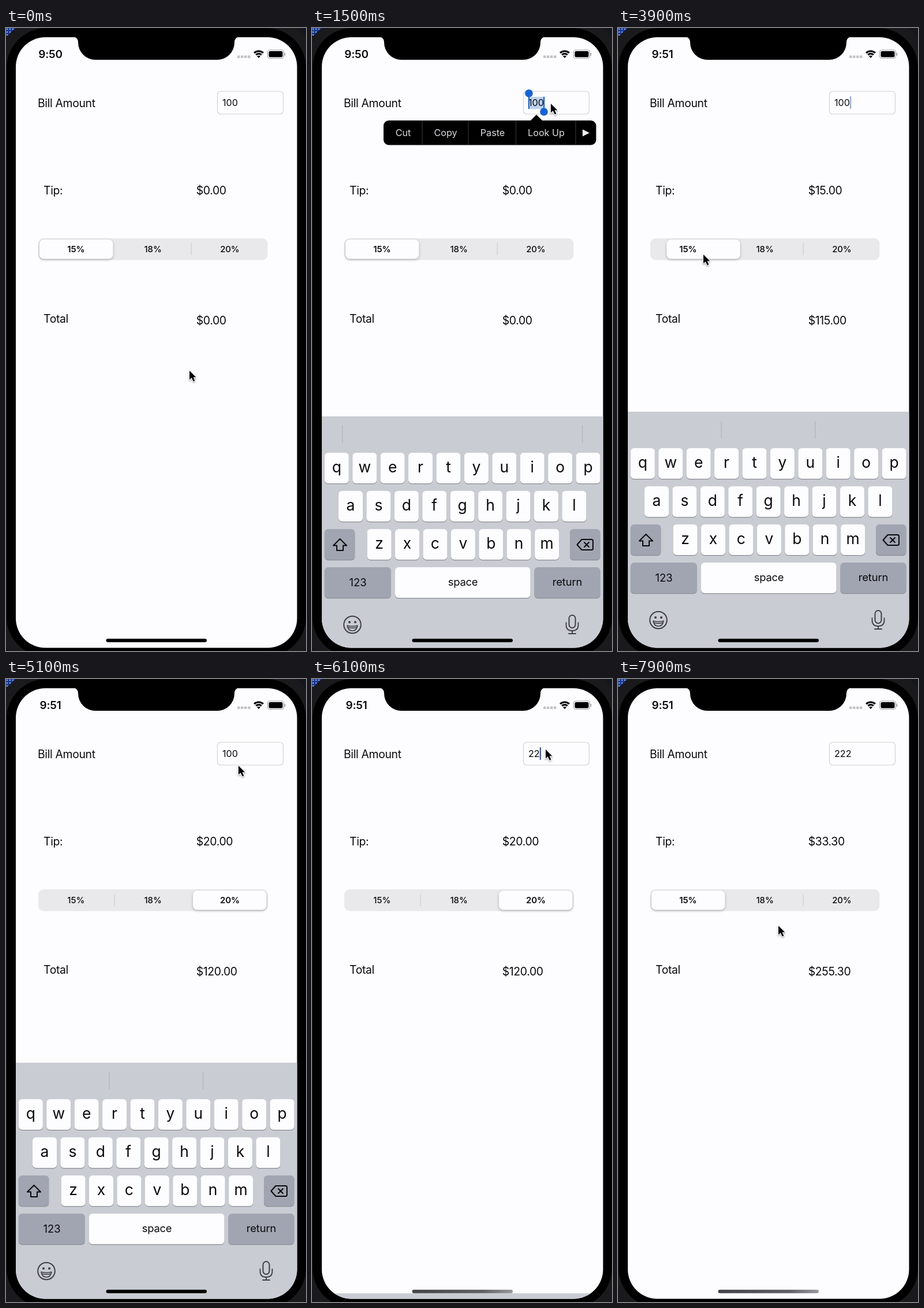
An HTML page with a canvas for the animation above (8000 ms loop, 520 px wide and 1078 px high).

```html
<!DOCTYPE html>
<html lang="en">
<head>
<meta charset="utf-8">
<title>Tip calculator</title>
<style>
html, body { margin: 0; width: 100%; height: 100%; overflow: hidden; background: #000; }
canvas { display: block; }
</style>
</head>
<body>
<canvas id="stage" width="520" height="1078"></canvas>
<script>
const c = document.getElementById('stage').getContext('2d');
const LOOP = 8000, STEP = 100, TAU = Math.PI * 2;
const WHITE = '#fdfcff', INK = '#0a0a0c', BLUE = '#1463d8';
const RATES = [15, 18, 20];
const ARROW = 'M0 1 V16.5 L3.7 13.2 L6.8 19.5 L9.5 18.2 L6.6 12.2 H11.3 Z';

// Pointer stops: time, x, y
const PATH = [
  [0, 318, 592], [900, 414, 130], [2000, 414, 130], [2700, 236, 378], [3300, 236, 378],
  [3700, 148, 391], [4000, 148, 391], [4500, 385, 390], [4700, 385, 390], [5200, 405, 121],
  [6200, 405, 121], [6800, 280, 370], [6900, 264, 381], [7000, 264, 381],
  [7400, 140, 388], [7900, 278, 426]
];
// Segment taps: time, segment
const TAPS = [[3000, 1], [3700, 0], [4500, 2], [6800, 1], [7400, 0]];
const BILLS = [[0, '100'], [5800, '2'], [6000, '22'], [6200, '222']];

const clamp = v => Math.min(1, Math.max(0, v));
const fadeOut = (t, start) => t < start ? 1 : clamp(1 - ((t - start) / 300) ** 2);
const latest = (list, t) => list.filter(e => e[0] <= t).pop();

function box(x, y, w, h, r, fill) {
  c.beginPath();
  c.roundRect(x, y, w, h, r);
  if (fill) { c.fillStyle = fill; c.fill(); }
}

function disc(x, y, r, fill) {
  c.beginPath();
  c.arc(x, y, r, 0, TAU);
  c.fillStyle = fill;
  c.fill();
}

function shape(d, x, y, { fill, stroke, width = 2 }) {
  const p = new Path2D(d);
  c.save();
  c.translate(x, y);
  c.lineJoin = c.lineCap = 'round';
  c.lineWidth = width;
  if (stroke) { c.strokeStyle = stroke; c.stroke(p); }
  if (fill) { c.fillStyle = fill; c.fill(p); }
  c.restore();
}

function text(s, x, y, size, { weight = 400, align = 'left', color = INK, gap = 0 } = {}) {
  c.font = `${weight} ${size}px Inter, "Liberation Sans", sans-serif`;
  c.letterSpacing = gap + 'px';
  c.textAlign = align;
  c.fillStyle = color;
  c.fillText(s, x, y);
}
const label = (s, x, y) => text(s, x, y, 19.4, { gap: -0.35 });
const centred = (s, x, y, size, more) => text(s, x, y, size, { align: 'center', ...more });

function pointerAt(t) {
  const a = latest(PATH, t), b = PATH[PATH.indexOf(a) + 1] || a;
  const u = a === b ? 0 : (t - a[0]) / (b[0] - a[0]), e = u * u * (3 - 2 * u);
  return [a[1] + (b[1] - a[1]) * e, a[2] + (b[2] - a[2]) * e];
}

function thumbAt(t) {
  let pos = 0;
  for (const [start, seg] of TAPS) {
    const u = clamp((t - start) / 360);
    pos += (seg - pos) * (1 - (1 - u) ** 2);
  }
  return pos;
}

// How far the keyboard sits below its resting place
function keyboardDrop(t) {
  const settle = start => Math.exp(-Math.max(0, t - start) / 90);
  return 408 * (t < 5700 ? settle(1150) : 1 - settle(5755));
}

function bezel() {
  c.fillStyle = '#14161d';
  c.fillRect(0, 0, 520, 1078);
  c.fillStyle = '#173a9c';
  c.fillRect(0, 0, 16, 13);
  for (let y = 1; y < 12; y += 5)
    for (let x = 1; x < 14; x += 5) disc(x + 1, y + 1, 1.3, '#8fa6d8');
  box(-14, -14, 549, 1116, 75, '#1a1a1d');
  box(1, 0, 519, 1088, 69, '#000');
}

function statusBar(t) {
  shape('M116 15 Q125 16 125 25 A30 30 0 0 0 155 55 H366 A30 30 0 0 0 396 25 Q396 16 405 15 Z', 0, 0, { fill: '#000' });
  centred(t < 2100 ? '9:50' : '9:51', 77, 52, 19, { weight: 600, gap: -0.2 });
  for (let i = 0; i < 4; i++) box(401 + 6 * i, 47.5, 4.5, 4.5, 1, '#c3c2c6');
  c.strokeStyle = '#000';
  c.lineWidth = 3;
  for (const r of [7, 11.5]) {
    c.beginPath();
    c.arc(438, 51.5, r, -2.33, -0.81);
    c.stroke();
  }
  shape('M0 0 L-3 -3.2 Q0 -5.5 3 -3.2 Z', 438, 52, { fill: '#000' });
  box(453.5, 38, 28, 14.5, 4);
  c.strokeStyle = '#a5a4a8';
  c.lineWidth = 1.2;
  c.stroke();
  box(455.5, 40, 24, 10.5, 2.5, '#000');
  box(482.5, 43, 1.8, 5, 1, '#a5a4a8');
}

function segments(t) {
  const pos = thumbAt(t);
  box(56, 364, 397.5, 37.5, 9, '#e9e8ea');
  [188, 321].forEach((x, i) => {
    if (pos < i - 0.4 || pos > i + 1.4) box(x - 0.5, 372, 1.2, 21, 0, '#cfced2');
  });
  c.save();
  c.shadowColor = 'rgba(0,0,0,.28)';
  c.shadowBlur = 4;
  c.shadowOffsetY = 1.5;
  box(58 + 133 * pos, 366, 127.5, 33.5, 7.5, WHITE);
  c.restore();
  RATES.forEach((r, i) => centred(r + '%', 121.3 + 133.3 * i, 388.3, 15,
    { weight: Math.round(pos) === i ? 600 : 500, gap: -0.1 }));
}

function field(t, bill) {
  box(366.5, 109.5, 114, 39.5, 6);
  c.strokeStyle = '#d3d2d6';
  c.lineWidth = 1.2;
  c.stroke();

  const picked = (t >= 1300 && t < 2100) || (t >= 5300 && t < 5800);
  if (picked) box(375, 119, 28, 21, 0, '#bdd1ec');
  text(bill, 375, 135.3, 16.2);
  const end = 376 + c.measureText(bill).width;
  if (picked || t === 5800) {
    const r = picked ? 6.8 : 4.5;
    c.globalAlpha = picked ? 1 : 0.3;
    box(374.8, 113, 2.2, 27, 0, BLUE);
    box(401, 119, 2.2, 26, 0, BLUE);
    disc(376, 113, r, BLUE);
    disc(402, 145, r, BLUE);
  }
  if (t >= 1200 && !picked) {
    const origin = t < 5700 ? 2650 : 6300;
    const blink = clamp(0.5 + 1.6 * Math.cos((t - origin) / 1000 * TAU));
    c.globalAlpha = t >= 5800 && t < 6300 ? 1 : blink;
    box(end - 1, 118, 2.2, 22, 1, '#2858d6');
  }
  c.globalAlpha = 1;
}

// items: [caption, centre]; lines: divider positions
function menu(x, y, w, tip, items, lines, alpha) {
  if (alpha <= 0) return;
  c.globalAlpha = alpha;
  shape('M0 0 L-11 11 H11 Z', tip, y - 10, { fill: '#000' });
  box(x, y, w, 42.5, 9, '#000');
  for (const lx of lines) box(lx - 0.5, y, 1, 42.5, 0, '#3c3b3f');
  for (const [s, cx] of items) centred(s, cx, y + 27, 16.2, { color: '#dddce0' });
  c.globalAlpha = 1;
}

function menus(t) {
  const first = t < 1400 ? 0 : t < 5400 ? fadeOut(t, 2000) : fadeOut(t, 5700);
  menu(124, 160, 368.5, 389, [['Cut', 158], ['Copy', 231.5], ['Paste', 313], ['Look Up', 406]],
    [191, 271, 353.5, 457], first);
  if (first > 0) {
    c.globalAlpha = first;
    shape('M0 -6 L12 0 L0 6 Z', 469, 181.5, { fill: '#f2f1f4' });
    c.globalAlpha = 1;
  }
  menu(191, 157.5, 283, 404, [['Select', 235.5], ['Select All', 336], ['Paste', 432.5]],
    [279, 391], t < 6500 ? 0 : fadeOut(t, 6700));
}

function key(x, y, w, fill = WHITE) {
  box(x, y + 1.3, w, 53, 6, '#8b8e95');
  box(x, y, w, 53, 6, fill);
}

function keyboard(t) {
  const drop = keyboardDrop(t), grey = '#a0a5b1', icon = '#3d3f45';
  if (drop > 407.5) return;
  c.save();
  c.translate(0, Math.round(drop));
  c.fillStyle = '#c9ccd3';
  c.fillRect(0, 664, 520, 420);
  const wide = t < 2100 || t >= 5300;
  for (const x of wide ? [52, 468] : [178.5, 341]) box(x, 680, 1.2, 30, 0, '#b1b4bb');

  ['qwertyuiop', 'asdfghjkl', 'zxcvbnm'].forEach((row, r) => {
    const left = [21.8, 46, 95.6][r], y = 727 + 66 * r;
    [...row].forEach((ch, i) => {
      const x = left + 48.42 * i;
      key(x, y, 42);
      centred(ch, x + 21, y + 34, 26.5);
    });
  });
  key(21.8, 859, 52.5, grey);
  key(447, 859, 52.5, grey);
  key(21.8, 925, 115, grey);
  key(144, 925, 234.5);
  key(385.5, 925, 114, grey);
  centred('123', 79.5, 957.5, 18.4);
  centred('space', 261.5, 957, 18.4, { gap: -0.2 });
  centred('return', 442.5, 957, 18.4, { gap: -0.1 });

  shape('M0 -10 L11.5 1.5 H5.5 V10 H-5.5 V1.5 H-11.5 Z', 48.5, 886, { stroke: INK });
  shape('M-14 0 L-6 -9 H11 Q13.5 -9 13.5 -6.5 V6.5 Q13.5 9 11 9 H-6 Z M-1.5 -4 L6.5 4 M6.5 -4 L-1.5 4',
    473.5, 886, { stroke: INK });

  c.strokeStyle = icon;
  c.lineWidth = 2;
  c.beginPath();
  c.arc(70, 1024.5, 14.8, 0, TAU);
  c.stroke();
  disc(65, 1020, 2.1, icon);
  disc(75, 1020, 2.1, icon);
  shape('M-9 0 Q0 2.5 9 0 Q7.5 9 0 9 Q-7.5 9 -9 0 Z M-7 3.2 Q0 5 7 3.2', 70, 1026, { stroke: icon, width: 1.6 });
  box(445.5, 1008, 11, 22, 5.5);
  c.stroke();
  shape('M-10.5 0 V4 Q-10.5 14 0 14 Q10.5 14 10.5 4 V0 M0 14 V19 M-6 19 H6', 451, 1021, { stroke: icon, width: 1.8 });
  c.restore();
}

function homeBar(t) {
  let fill = '#000';
  if (t >= 5500) {
    fill = c.createLinearGradient(174, 0, 348, 0);
    fill.addColorStop(0, '#434347');
    fill.addColorStop(0.7, '#606064');
    fill.addColorStop(1, '#98989c');
  }
  box(173.5, 1056.8, 174.5, 6, 3, fill);
}

function pointer(t) {
  const [x, y] = pointerAt(t);
  c.save();
  c.shadowColor = 'rgba(0,0,0,.35)';
  c.shadowBlur = 3;
  c.shadowOffsetY = 1.5;
  shape(ARROW, x, y, { stroke: '#fff', width: 2.2 });
  c.restore();
  shape(ARROW, x, y, { fill: '#000' });
}

function draw(t) {
  const bill = latest(BILLS, t)[1];
  const tap = TAPS.filter(e => e[0] < t).pop();
  // The sums refresh only when a segment is tapped
  const base = tap ? +latest(BILLS, tap[0])[1] : 0;
  const tip = tap ? base * RATES[tap[1]] / 100 : 0;

  bezel();
  c.save();
  box(17, 16, 487.5, 1056.5, 51, WHITE);
  c.clip();
  label('Bill Amount', 55, 137);
  label('Tip:', 65, 288);
  label('Total', 65, 509.5);
  label('$' + tip.toFixed(2), 329.7, 288);
  label('$' + (base + tip).toFixed(2), 329.7, 513);
  segments(t);
  field(t, bill);
  keyboard(t);
  menus(t);
  homeBar(t);
  statusBar(t);
  c.restore();
  pointer(t);
}

const begin = performance.now();
function tick() {
  const t = (performance.now() - begin) % LOOP;
  draw(Math.floor(t / STEP) * STEP);
  requestAnimationFrame(tick);
}
tick();
</script>
</body>
</html>
```
